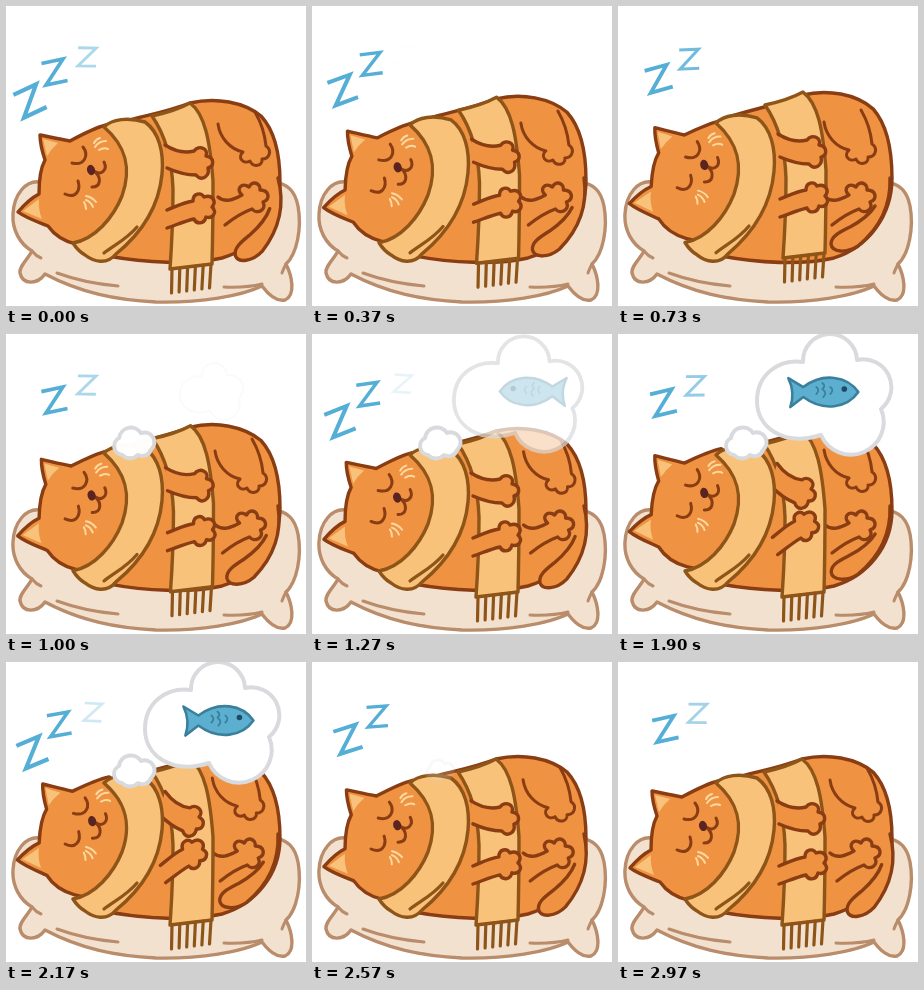
Write an HTML page that moves like this. It is 300 px wide and 300 px high and loops after 3.01 s.

```html
<!DOCTYPE html>
<html lang="en">
<head>
<meta charset="utf-8">
<title>Sleeping cat</title>
<style>
  html, body { margin: 0; width: 100%; height: 100%; overflow: hidden; background: #fff; }
  svg { display: block; width: 100vw; height: 100vh; }
  path, ellipse { stroke-linecap: round; stroke-linejoin: round; }
  .pillow { fill: #f3e1d0; stroke: #b98d6b; stroke-width: 3.4; }
  .seam { fill: none; stroke: #b98d6b; stroke-width: 3; }
  .fur { fill: #ef9242; stroke: #8a3d12; stroke-width: 3.4; }
  .ear { fill: #f8c27a; }
  .line { fill: none; stroke: #8a3d12; stroke-width: 3; }
  .whisker { fill: none; stroke: #fbd9a0; stroke-width: 2; }
  .scarf { fill: #f8c27a; stroke: #8f5518; stroke-width: 3.4; }
  .fold { fill: none; stroke: #8f5518; stroke-width: 3.2; }
  .cloud { fill: #fff; stroke: #d9dadd; stroke-width: 4; }
  .fish { fill: #5cafcf; stroke: #3a809d; stroke-width: 2.6; }
  .z { fill: none; stroke: #55aed5; stroke-linejoin: miter; stroke-linecap: butt; }
</style>
</head>
<body>
<svg viewBox="0 0 300 300">
  <path class="pillow" d="M34 176C20 174 8 188 7 208C6 224 14 238 26 245C22 253 13 260 14 267C17 280 32 278 39 268
    C75 287 110 294 150 296C195 297 235 290 256 280C262 288 270 296 279 294C290 289 286 270 280 258
    C291 248 296 222 292 200C289 185 282 178 268 176Z"/>
  <path class="seam" d="M26 245Q30 250 35 252M51 267Q78 277 112 280M218 281Q240 282 256 278M280 258Q277 264 276 267"/>

  <g id="body">
    <path class="fur" d="M97 124C118 112 150 110 184 97C210 91 238 96 255 110C268 124 274 148 274 176
      C274 212 250 242 216 252C184 259 140 257 102 250Z"/>
  </g>
  <path id="tail" class="fur" d="M272 172C273 200 262 222 240 240C228 248 214 246 213 238C213 230 222 226 232 221
    C245 214 252 208 257 200"/>
  <path id="upperFoot" class="line" d="M206 116C208 130 218 141 231 144C225 149 231 157 238 153C241 160 251 158 250 151
    C258 151 260 142 254 138C253 128 250 116 243 104"/>
  <path id="lowerFoot" class="fur" d="M207 191C214 197 222 194 231 189C224 183 231 176 238 181C241 174 250 177 249 184
    C258 184 260 193 252 196C256 204 246 209 241 203C230 207 224 211 214 219"/>

  <g id="head">
    <path class="fur" d="M39 154C36 145 34 136 34 129C44 131 53 133 64 135C77 128 88 122 100 119C135 143 136 218 104 238
      C84 243 56 240 42 220C32 216 20 212 12 206C18 199 25 192 33 188C33 174 34 163 39 154Z"/>
    <path class="ear" d="M37 133L52 137Q45 143 41 150ZM17 205L33 193Q32 203 36 213Z"/>
    <path class="line" d="M77 141C83 149 79 160 66 157M72 175C75 184 70 193 59 188M88 165C95 170 102 164 98 156M88 165C96 171 95 181 86 181"/>
    <ellipse cx="85" cy="164" rx="4" ry="5.2" fill="#5c2420" transform="rotate(-15 85 164)"/>
    <path class="whisker" d="M89 141Q93 135 100 135M88 137Q90 133 94 132M93 144Q98 141 102 143M80 190Q86 191 90 196M80 194Q85 196 87 201M78 196Q80 199 80 203"/>
  </g>

  <g id="strap">
    <path class="scarf" d="M146 110C160 107 173 103 184 97C199 108 204 135 207 175Q207 220 206 258L164 263
      C166 235 167 206 167 183C166 155 160 130 146 110Z"/>
    <path id="fringe" class="fold"/>
    <path id="upperArm" class="fur" d="M159 139C170 146 180 147 188 145C193 138 203 143 200 150C208 151 209 160 202 162
      C204 170 196 176 190 169C180 169 170 166 161 162"/>
    <path id="lowerArm" class="fur" d="M161 204C171 200 179 196 187 195C187 187 195 186 198 191C206 188 211 195 206 201
      C212 207 206 213 200 211C198 219 190 218 188 213C179 215 170 219 161 222"/>
  </g>

  <g id="collar">
    <path class="scarf" d="M98 121C106 113 122 111 139 116C153 126 158 146 156 168C153 200 137 226 110 248
      C101 259 88 256 79 249Q72 245 67 237C89 233 107 212 116 190C126 162 120 140 98 121Z"/>
    <path class="fold" d="M131 221C120 234 108 239 98 247"/>
  </g>

  <g id="dream">
    <path class="cloud" d="M185 28A27 27 0 0 1 239 26A28 28 0 0 1 263 75A30 30 0 0 1 203 101
      C165 113 139 93 139 67C139 40 161 25 185 28Z"/>
    <g id="fish">
      <path class="fish" d="M35 0C24 16 0 20 -20 5L-33 15Q-28 0 -35 -14L-20 -5C0 -20 24 -16 35 0Z"/>
      <path d="M-7 -5q4 3 0 7M0 -2q4 3 0 7M7 -5q4 3 0 7M-1 -9q4 3 0 6" fill="none" stroke="#3a809d" stroke-width="1.8"/>
      <circle cx="21" cy="-3" r="2.8" fill="#1f4a63"/>
    </g>
  </g>
  <path id="puff" class="cloud" d="M116 121A9 9 0 0 1 113 104A12 12 0 0 1 135 99A10 10 0 0 1 145 116A9 9 0 0 1 132 121A11 11 0 0 1 116 121Z"/>
  <g id="zs"><path class="z"/><path class="z"/><path class="z"/></g>
</svg>
<script>
  const LOOP = 3010, Z_GAP = LOOP / 3;
  const part = id => document.getElementById(id);
  const letters = [...part('zs').children];

  const clamp = v => Math.max(0, Math.min(1, v));
  const ramp = (t, from, to) => clamp((t - from) / (to - from));
  const smooth = v => (1 - Math.cos(Math.PI * v)) / 2;
  const linear = v => v;

  // keys: [x, value] pairs in rising order of x
  function track(keys, x, ease = smooth) {
    let i = 1;
    while (i < keys.length - 1 && x > keys[i][0]) i++;
    const [x0, v0] = keys[i - 1], [x1, v1] = keys[i];
    return v0 + (v1 - v0) * ease(ramp(x, x0, x1));
  }

  const BREATH = [[0, 0], [720, 1], [1250, .08], [1950, 1], [2180, .95], [2650, .1], [LOOP, 0]];
  const LIFT = [[0, 0], [720, 1], [1270, 0]];
  const HOLD = [[1270, 0], [1850, 1], [2180, 1], [2600, 0]];
  const FISH_X = [[1150, 226], [1270, 222], [1560, 200], [2400, 215]];
  const FISH_TURN = 1560;
  const Z_X = [[0, 24], [.27, 28], [.6, 37], [1, 48.5], [1.5, 63], [2, 81], [2.3, 92]];
  const Z_Y = [[0, 95], [.27, 87.5], [.6, 76], [1, 66], [1.5, 55], [2, 51], [2.3, 49.5]];

  const transform = (id, value) => part(id).setAttribute('transform', value);
  const shift = (id, x, y) => transform(id, `translate(${x} ${y})`);
  const swell = (id, base, k) => transform(id, `translate(0 ${-base * k}) scale(1 ${1 + k})`);

  function pop(id, scale, opacity, x, y) {
    transform(id, `translate(${x} ${y}) scale(${scale}) translate(${-x} ${-y})`);
    part(id).setAttribute('opacity', opacity);
  }

  function drawLetter(el, age) {
    const size = track([[0, 25], [1, 22], [2.3, 17]], age, linear) / 2;
    const angle = track([[0, -25], [1, -12], [2, 1], [2.3, 4]], age, linear);
    el.setAttribute('d', `M${-size} ${-size}H${size}L${-size} ${size}H${size}`);
    el.setAttribute('transform',
      `translate(${track(Z_X, age, linear)} ${track(Z_Y, age, linear)}) rotate(${angle})`);
    el.setAttribute('stroke-width', track([[0, 4.2], [1, 3.7], [2.3, 2.5]], age, linear));
    el.setAttribute('opacity', 1 - ramp(age, 1.6, 2.38));
  }

  function drawCat(t) {
    const breath = track(BREATH, t), lift = track(LIFT, t), hold = track(HOLD, t);
    const rest = 1 - breath;
    swell('body', 254, .05 * lift);
    swell('collar', 254, .03 * lift);
    transform('head', `translate(0 ${-4 * breath}) rotate(${2.6 * breath} 110 190)`);
    transform('tail', `rotate(${-13 * rest} 272 172)`);
    shift('upperFoot', 6 * rest, 2 * rest);
    shift('lowerFoot', 5 * rest, 0);
    shift('strap', lift, -11 * lift);
    transform('upperArm', `translate(${-4 * hold} ${-10 * hold}) rotate(${22 * hold} 160 150)`);
    transform('lowerArm', `translate(${-4 * hold} ${-1 * hold}) rotate(${-17 * hold} 161 213)`);
  }

  function drawDream(t) {
    const grown = smooth(ramp(t, 900, 1350)), gone = smooth(ramp(t, 2260, 2530));
    pop('dream', .4 + .6 * grown, ramp(t, 950, 1400) * (1 - gone), 205, 55);
    const puffIn = smooth(ramp(t, 780, 1020)), puffOut = ramp(t, 2380, 2610);
    pop('puff', .4 + .6 * puffIn - .4 * puffOut, puffIn * (1 - puffOut), 128, 107);
    const y = track([[1600, 57.5], [2170, 58.5]], t);
    transform('fish', `translate(${track(FISH_X, t)} ${y}) scale(${t < FISH_TURN ? -1 : 1} 1)`);
    part('fish').setAttribute('opacity', ramp(t, 1100, 1500));
  }

  function render(t) {
    drawCat(t);
    drawDream(t);
    const phase = t % Z_GAP / Z_GAP;
    letters.forEach((el, i) => drawLetter(el, phase + i));
  }

  part('fringe').setAttribute('d',
    Array.from({ length: 6 }, (_, i) => `M${166 + 7.8 * i} ${263 - i}L${165.5 + 7.6 * i} ${287 - i}`).join(''));

  const start = performance.now();
  function tick() {
    render((performance.now() - start) % LOOP);
    requestAnimationFrame(tick);
  }
  tick();
</script>
</body>
</html>
```
